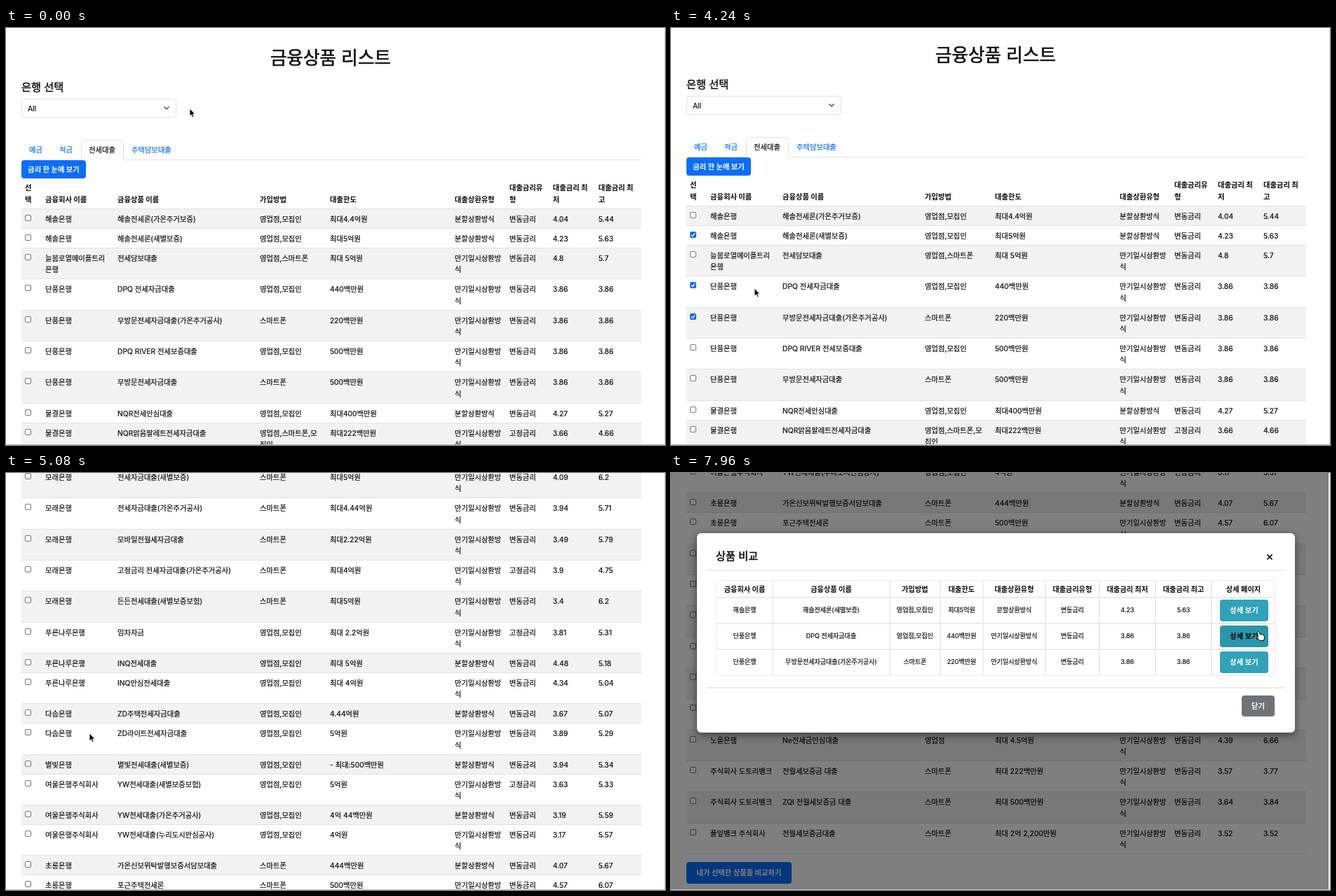
An HTML page that plays this animation: 940x596 px, repeating every 8 s.

```html
<!DOCTYPE html>
<html lang="ko">
<head>
<meta charset="utf-8">
<title>금융상품 리스트</title>
<style>
  html, body { margin: 0; width: 100%; height: 100%; overflow: hidden; background: #fff; }
  body { position: relative; color: #0c0d0f; font: 10.3px/16.3px Inter, "Noto Sans CJK KR", "Noto Sans CJK", "Noto Sans CJK JP", sans-serif; -webkit-text-stroke: .2px; }
  div, span, svg { position: absolute; box-sizing: border-box; white-space: pre; }
  #view { left: 0; top: 0; width: 940px; height: 596px; overflow: hidden; }
  #page { left: 0; top: 0; width: 940px; height: 2025px; }
  .title { top: 24px; left: 0; width: 926px; text-align: center; font-size: 25.6px; line-height: 38px; -webkit-text-stroke: .6px; }
  .label { left: 22px; top: 75px; font-size: 15.2px; line-height: 20px; -webkit-text-stroke: .4px; }
  .select { left: 22px; top: 101px; width: 221px; height: 27px; border: 1px solid #dee2e6; border-radius: 4px; padding: 5px 8px; }
  .tabs { left: 22px; top: 160px; width: 884px; height: 29px; border-bottom: 1px solid #dee2e6; color: #0d6efd; }
  .tabs span { top: 6px; }
  .tabs .active { left: 85px; top: 0; width: 61px; height: 29px; padding: 5px 10px; color: #0c0d0f; background: #fff; border: 1px solid #dee2e6; border-bottom: 0; border-radius: 4px 4px 0 0; }
  .btn { display: flex; align-items: center; justify-content: center; border-radius: 4px; background: #0d6efd; color: #fff; font-weight: 700; }
  .head, .row { left: 22px; width: 884px; border-bottom: 1px solid #dee2e6; }
  .head { top: 220px; height: 39px; font-weight: 700; }
  .btn, .head, .cell.th { -webkit-text-stroke: 0; }
  .head span { bottom: 5px; }
  .row span { top: 6px; }
  .row.odd { background: #f2f2f2; }
  .box { left: 5px; top: 8px; width: 9px; height: 9px; border: 1px solid #767676; border-radius: 2px; background: #fff; }
  .box svg { display: none; left: -1px; top: -1px; }
  .box.on { border-color: #0b6cf5; background: #0b6cf5; }
  .box.on svg { display: block; }
  #shade { left: 0; top: 0; width: 938px; height: 595px; background: #000; }
  #modal { left: 37px; top: 86px; width: 853px; height: 285px; background: #fff; border-radius: 6px; box-shadow: 0 3px 12px rgba(0, 0, 0, .5); }
  .heading { left: 27px; top: 23px; font-size: 15.2px; line-height: 20px; -webkit-text-stroke: .5px; }
  .rule { left: 13px; width: 826px; height: 2px; background: #ececec; }
  .cell { display: flex; align-items: center; justify-content: center; box-shadow: 0 0 0 1px #ececec; font-size: 9px; }
  .cell.th { font-size: 10.2px; font-weight: 700; }
  .detail { left: 746px; width: 69px; height: 31px; background: #31a2b8; }
  .detail.hover { background: #2b96ab; color: #000; }
  #bottom { left: 0; top: 595px; width: 940px; height: 1px; background: #b8b8b8; }
  #right { left: 938px; top: 0; width: 2px; height: 595px; background: linear-gradient(90deg, #fff 50%, #dcdcdc 50%); }
  #cursor { left: 0; top: 0; overflow: visible; }
</style>
</head>
<body>
<div id="view">
  <div id="page">
    <div class="title">금융상품 리스트</div>
    <div class="label">은행 선택</div>
    <div class="select">All
      <svg style="left:201px;top:8px" width="10" height="9" fill="none" stroke="#343a40" stroke-width="1.2"><path d="M1.5 2.5 5 6 8.5 2.5"/></svg>
    </div>
    <div class="tabs">
      <span style="left:11px">예금</span><span style="left:54px">적금</span>
      <div class="active">전세대출</div><span style="left:157px">주택담보대출</span>
    </div>
    <div class="btn" style="left:22px;top:189px;width:92px;height:26px">금리 한 눈에 보기</div>
    <div class="btn" id="compare" style="left:22px;top:1985px;width:150px;height:31px">내가 선택한 상품들 비교하기</div>
  </div>
  <div id="shade"></div>
  <div id="modal">
    <span class="heading">상품 비교</span>
    <svg style="left:812px;top:29px" width="10" height="10" stroke="#000" stroke-width="1.7"><path d="M1.5 1.5 8.5 8.5M8.5 1.5 1.5 8.5"/></svg>
    <div class="rule" style="top:52px"></div>
    <div class="rule" style="top:220px"></div>
    <div class="btn" style="left:777px;top:232px;width:47px;height:30px;background:#707276">닫기</div>
  </div>
  <div id="bottom"></div>
  <div id="right"></div>
  <svg id="cursor" width="16" height="18">
    <path id="arrow" d="M0 0V11.2L2.6 8.9 4.3 12.9 6.2 12.1 4.5 8.2H7.8Z" fill="#000" stroke="#fff" stroke-width=".9"/>
    <path id="hand" d="M-1 0C1-1 1.4 1 2.2 4L3 3.2 4.3 4 5.3 3.5 6.4 4.6 7.7 4.5 8.5 8 7.6 12.6H1.8L-2.6 7.6C-3.4 6-1.6 5.6-.3 7.2L-2 1.3Q-2 .3-1 0Z" fill="#fff" stroke="#000" stroke-width="1"/>
  </svg>
</div>
<script>
const $ = id => document.getElementById(id);
const METHOD = { A: '영업점,모집인', S: '스마트폰', O: '영업점', P: '영업점,스마트폰', Q: '영업점,스마트폰,모\n집인' };
const REPAY = { B: '분할상환방식', M: '만기일시상환방\n식' };
const RATE = { V: '변동금리', F: '고정금리' };

// bank | product | method, repayment and rate type | limit | lowest | highest
const products = `해솔은행|해솔전세론(가온주거보증)|ABV|최대4.4억원|4.04|5.44
해솔은행|해솔전세론(새별보증)|ABV|최대5억원|4.23|5.63
늘봄로열메이플트리/은행|전세담보대출|PMV|최대 5억원|4.8|5.7
단풍은행|DPQ 전세자금대출|AMV|440백만원|3.86|3.86
단풍은행|무방문전세자금대출(가온주거공사)|SMV|220백만원|3.86|3.86
단풍은행|DPQ RIVER 전세보증대출|AMV|500백만원|3.86|3.86
단풍은행|무방문전세자금대출|SMV|500백만원|3.86|3.86
물결은행|NQR전세안심대출|ABV|최대400백만원|4.27|5.27
물결은행|NQR맑음팔레트전세자금대출|QMF|최대222백만원|3.66|4.66
물결은행|NQR시그니처전세자금대출|ABV|최대500백만원|4.27|5.27
들꽃은행|TFQ모바일 전세대출(가온주거안심공사)|SMV|222백만원|4.17|4.87
들꽃은행|TFQ모바일 전세대출(새별보증보험)|SMV|5억원|4.4|5.1
들꽃은행|(특판)TFQ오순도순 청년맞춤형 전월세보증/금 대출|OMV|2억원|4.38|4.58
바람은행|주택전세자금대출|OMV|임차보증금의 80%범위내|6.19|6.89
바람은행|BRJ일반전세자금대출|OMV|임차보증금의 80% 범위내 최고 444/백만원|6.24|6.94
솔숲은행|PLUM전세자금대출|AMV|최저 1천만원, 최고 5억원 이내|6.39|7.69
모래은행|전세자금대출(새별보증)|SMV|최대5억원|4.09|6.2
모래은행|전세자금대출(가온주거공사)|SMV|최대4.44억원|3.94|5.71
모래은행|모바일전월세자금대출|SMV|최대2.22억원|3.49|5.79
모래은행|고정금리 전세자금대출(가온주거공사)|SMF|최대4억원|3.9|4.75
모래은행|든든전세대출(새별보증보험)|SMV|최대5억원|3.4|6.2
푸른나루은행|임차자금|AMF|최대 2.2억원|3.81|5.31
푸른나루은행|INQ전세대출|ABV|최대 5억원|4.48|5.18
푸른나루은행|INQ안심전세대출|AMV|최대 4억원|4.34|5.04
다솜은행|ZD주택전세자금대출|ABV|4.44억원|3.67|5.07
다솜은행|ZD라이트전세자금대출|AMV|5억원|3.89|5.29
별빛은행|별빛전세대출(새별보증)|ABV|- 최대:500백만원|3.94|5.34
여울은행주식회사|YW전세대출(새별보증보험)|AMF|5억원|3.63|5.33
여울은행주식회사|YW전세대출(가온주거공사)|ABV|4억 44백만원|3.19|5.59
여울은행주식회사|YW전세대출(누리도시안심공사)|AMV|4억원|3.17|5.57
초롱은행|가온신보위탁발행보증서담보대출|SBV|444백만원|4.07|5.67
초롱은행|포근주택전세론|SMV|500백만원|4.57|6.07
초롱은행|전세금안심대출|SMV|400백만원|4.66|5.96
주식회사 두루뱅크|전세대출|SMV|222백만원|3.65|3.65
주식회사 두루뱅크|고정금리 전세대출|SMF|200백만원|3.79|3.79
노을은행|공공주택임차보증금담보대출|OMV|최대 5억원|4.89|6.39
노을은행|Ne전세보증대출(가온주거공사)|OMV|최대 4.44억원|4.43|6.55
노을은행|Ne전세보증대출(새별보증보험)|OMV|최대 5억원|4.23|6.35
노을은행|Ne전세금안심대출|OMV|최대 4.5억원|4.39|6.66
주식회사 도토리뱅크|전월세보증금 대출|SMV|최대 222백만원|3.57|3.77
주식회사 도토리뱅크|ZQI 전월세보증금 대출|SMV|최대 500백만원|3.64|3.84
풀잎뱅크 주식회사|전월세보증금대출|SMV|최대 2억 2,200만원|3.52|3.52`
  .split('\n').map(line => {
    const [bank, name, [method, repay, rate], limit, low, high] = line.replace(/\//g, '\n').split('|');
    return [bank, name, METHOD[method], limit, REPAY[repay], RATE[rate], low, high];
  });

function add(parent, className, style = {}, text = '', tag = 'div') {
  const el = document.createElement(tag);
  el.className = className;
  el.textContent = text;
  for (const key in style) el.style[key] = style[key] + 'px';
  return parent.appendChild(el);
}

const COLUMNS = [34, 137, 340, 440, 618, 696, 758, 823];
const fillRow = (row, texts) => texts.forEach((text, i) => add(row, '', { left: COLUMNS[i] }, text, 'span'));

const head = add($('page'), 'head');
add(head, '', { left: 5 }, '선\n택', 'span');
fillRow(head, ['금융회사 이름', '금융상품 이름', '가입방법', '대출한도', '대출상환유형', '대출금리유\n형', '대출금리 최\n저', '대출금리 최\n고']);

let rowTop = 259;
const boxes = products.map((texts, i) => {
  const height = texts.some(text => text.includes('\n')) ? 44.33 : 28;
  const row = add($('page'), i % 2 ? 'row' : 'row odd', { top: rowTop, height });
  rowTop += height;
  const box = add(row, 'box');
  box.innerHTML = '<svg width="9" height="9" fill="none" stroke="#fff" stroke-width="1.4"><path d="M2 4.7 3.9 6.6 7 2.4"/></svg>';
  fillRow(row, texts);
  return box;
});

// Comparison table
const EDGE_X = [28, 108, 275, 347, 408, 497, 574, 654, 734, 825];
const EDGE_Y = [68, 92, 129, 166, 203];
const chosen = [1, 3, 4];
const titles = ['금융회사 이름', '금융상품 이름', '가입방법', '대출한도', '대출상환유형', '대출금리유형', '대출금리 최저', '대출금리 최고', '상세 페이지'];
[titles, ...chosen.map(i => [...products[i], ''])].forEach((texts, r) => texts.forEach((text, c) =>
  add($('modal'), r ? 'cell' : 'cell th', {
    left: EDGE_X[c], top: EDGE_Y[r],
    width: EDGE_X[c + 1] - EDGE_X[c], height: EDGE_Y[r + 1] - EDGE_Y[r]
  }, text.replace('\n', ''))));
const details = [95, 132, 169].map(top => add($('modal'), 'btn detail', { top }, '상세 보기'));

// Keys: time, then values
const CURSOR = [[0, 262, 115], [840, 60, 265], [1240, 31, 300], [1840, 31, 300], [1960, 30, 368], [2120, 30, 368],
  [2480, 30, 375], [2960, 30, 375], [3600, 31, 415], [3800, 31, 415], [4200, 119, 372], [5360, 119, 372],
  [5840, 118, 557], [6920, 118, 557], [7720, 545, 215], [7940, 838, 227]];
const SCROLL = [[4200, 0], [4480, 28], [4560, 248], [4640, 486], [4720, 660], [4800, 780], [4900, 870], [5000, 911],
  [5120, 911], [5160, 1010], [5240, 1300], [5280, 1400], [5320, 1429]];
const CHECKS = [1440, 2960, 3640];
const OPEN = 5920;
const STEP = 40;

const clamp = x => Math.min(1, Math.max(0, x));
const smooth = x => x * x * (3 - 2 * x);

function sample(keys, t, ease = x => x) {
  const next = keys.findIndex(key => key[0] > t);
  if (next < 0) return keys[keys.length - 1].slice(1);
  if (next === 0) return keys[0].slice(1);
  const from = keys[next - 1], to = keys[next];
  const k = ease((t - from[0]) / (to[0] - from[0]));
  return from.slice(1).map((v, i) => v + (to[i + 1] - v) * k);
}

function draw(now) {
  const t = Math.floor(now % 8000 / STEP) * STEP;
  const [x, y] = sample(CURSOR, t, smooth);
  const [scroll] = sample(SCROLL, t);
  $('page').style.transform = `translateY(${-scroll}px)`;
  chosen.forEach((row, i) => boxes[row].classList.toggle('on', t >= CHECKS[i]));

  const fade = clamp((t - OPEN) / 150);
  const slide = 1 - (1 - clamp((t - OPEN) / 300)) ** 2;
  $('shade').style.opacity = fade * .5;
  $('modal').style.opacity = fade;
  $('modal').style.transform = `translateY(${-35 * (1 - slide)}px)`;
  $('compare').style.background = t > 5720 && t < 7000 ? '#0b5ed7' : '#0d6efd';

  const hover = t > OPEN && x >= 783 && x <= 851 && y >= 218 && y <= 248;
  details[1].classList.toggle('hover', hover);
  $('arrow').style.display = hover ? 'none' : '';
  $('hand').style.display = hover ? '' : 'none';
  $('cursor').style.transform = `translate(${x}px, ${y}px)`;
  requestAnimationFrame(() => draw(performance.now()));
}
draw(performance.now());
</script>
</body>
</html>
```
